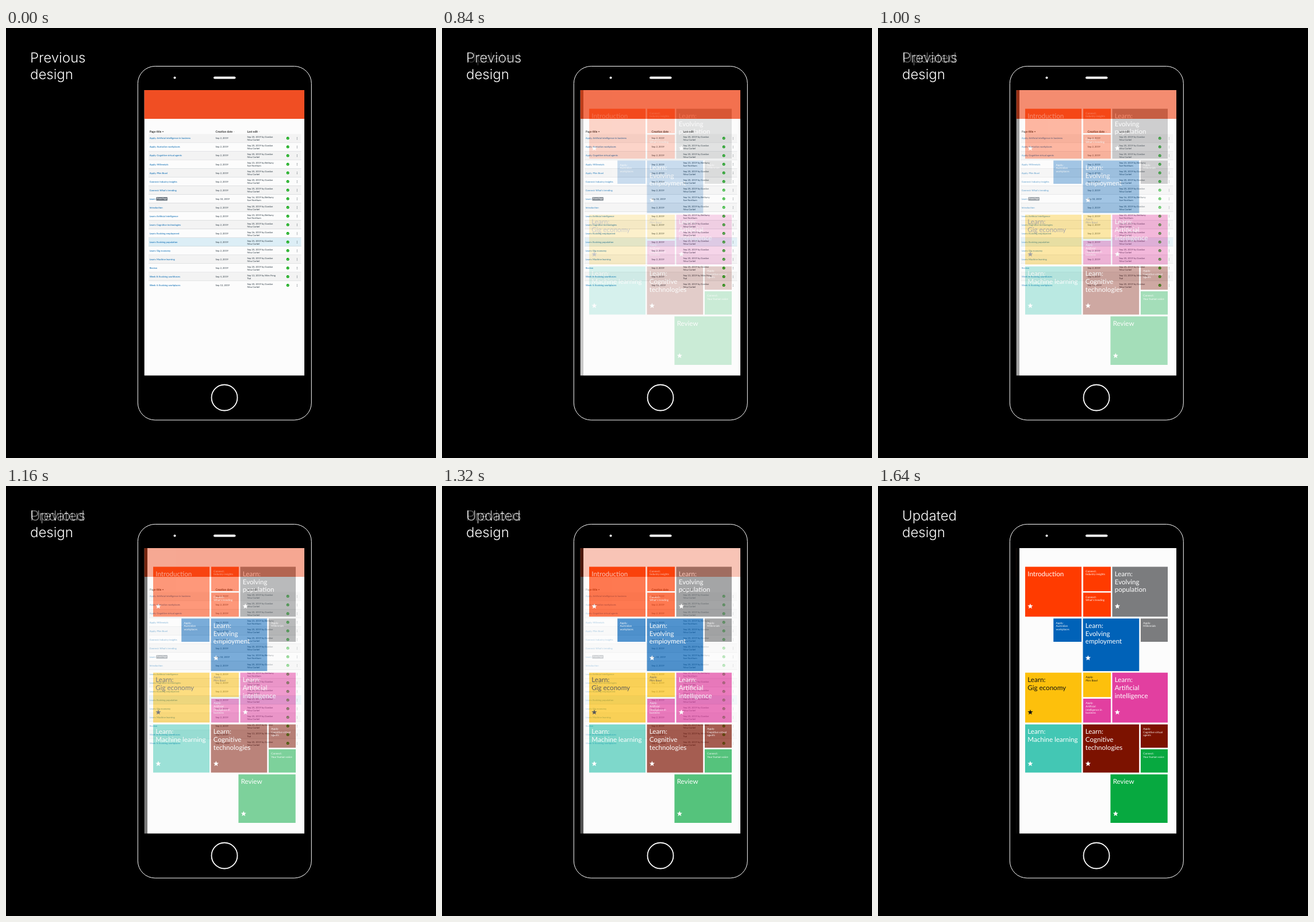
These frames come from a looping animation (748 by 748 pixels, 2.72 s). An HTML page:

```html
<!DOCTYPE html>
<html lang="en">
<head>
<meta charset="utf-8">
<title>Previous and updated design</title>
<style>
  html, body { margin: 0; width: 100%; height: 100%; overflow: hidden; background: #000; }
  svg { display: block; width: 100vw; height: 100vh; }
  text { font-family: Lato, sans-serif; text-rendering: geometricPrecision; }
  .label { font: 300 24px Inter, sans-serif; fill: #fff; }
  .head { font-size: 4.9px; font-weight: 700; fill: #222; }
  .cell { font-size: 4.2px; fill: #2d3b45; }
  .link { fill: #0a6cb4; font-weight: 500; }
  .big { font-size: 11.6px; }
  .small { font-size: 4.7px; }
  #updated { opacity: 0; animation: dissolve 2720ms infinite; }
  @keyframes dissolve {
    0% { opacity: 0; }
    25% { opacity: 0; animation-timing-function: steps(25, start); }
    61.7647%, 100% { opacity: 1; }
  }
</style>
</head>
<body>
<svg viewBox="0 0 748 748">
  <rect width="748" height="748"/>
  <g fill="none" stroke="#fff">
    <rect x="229.3" y="66.5" width="302" height="615.5" rx="30"/>
    <circle cx="380" cy="643" r="22.5" stroke-width="1.8"/>
  </g>
  <circle cx="293.5" cy="86.5" r="2" fill="#fff"/>
  <rect x="361" y="84.5" width="38.5" height="4" rx="2" fill="#fff"/>
  <text class="label" x="42" y="89">design</text>

  <g id="previous">
    <text class="label" x="42" y="60">Previous</text>
    <rect x="240.7" y="108" width="278.3" height="496.5" fill="#fcfcfc"/>
    <rect x="240.7" y="108" width="278.3" height="50" fill="#f04e23"/>
    <g class="head">
      <text class="head" x="249.7" y="181.7">Page title</text>
      <text class="head" x="364.5" y="181.7">Creation date</text>
      <text class="head" x="419.4" y="181.7">Last edit</text>
    </g>
    <path d="M272 181l1-2 1 2z" fill="#222"/>
    <path d="M396 181l.8-1.6.8 1.6zM440 181l.8-1.6.8 1.6z" fill="#bbb"/>
  </g>

  <g id="updated">
    <rect x="40" y="36" width="105" height="31"/>
    <rect x="240.2" y="107.5" width="279.3" height="497.5"/>
    <text class="label" x="42" y="60">Updated</text>
    <rect x="246" y="108" width="273" height="496.5" fill="#fcfcfc"/>
  </g>
</svg>
<script>
const previous = document.getElementById('previous');
const updated = document.getElementById('updated');

function add(parent, tag, attrs, content) {
  const el = document.createElementNS('http://www.w3.org/2000/svg', tag);
  for (const key in attrs) el.setAttribute(key, attrs[key]);
  if (content) el.textContent = content;
  parent.append(el);
  return el;
}

// Page list
const editors = {
  g: ['Gordon', 'Nina Corbel'],
  b: ['Bethany', 'Sue Northam'],
  w: ['Wen Feng', 'Tsai']
};
// title, day last edited, editor, day created
const pages = [
  ['Apply: Artificial intelligence in business'],
  ['Apply: Australian workplaces'],
  ['Apply: Cognitive virtual agents'],
  ['Apply: Millennials', 23, 'b'],
  ['Apply: Plim Bowl'],
  ['Connect: Industry insights'],
  ["Connect: What's trending"],
  ['Learn', 16, 'b', 10],
  ['Introduction'],
  ['Learn: Artificial intelligence', 23, 'b'],
  ['Learn: Cognitive technologies'],
  ['Learn: Evolving employment', 26],
  ['Learn: Evolving population', 25],
  ['Learn: Gig economy'],
  ['Learn: Machine learning'],
  ['Review'],
  ['Week 8: Evolving workforces', 13, 'w', 4],
  ['Week 4: Evolving workplaces', 20, 'g', 13]
];

pages.forEach(([title, day = 20, who = 'g', made = 2], i) => {
  const y = 192 + i * 15.04;
  const cell = (x, dy, text, cls = '') =>
    add(previous, 'text', { class: 'cell ' + cls, x, y: y + dy }, text);
  const [first, last] = editors[who];
  const fill = i === 12 ? '#dceef6' : i % 2 ? '#fcfcfc' : '#f3f3f3';

  add(previous, 'rect', { x: 248, y: y - 7.5, width: 265.5, height: 15.04, fill });
  if (i < 17) add(previous, 'rect', { x: 248, y: y + 7.1, width: 265.5, height: .6, fill: '#bfc3c6' });
  cell(249.7, 1.4, title, 'link');
  cell(364.5, 1.4, `Sep ${made}, 2019`);
  cell(419.4, -.8, `Sep ${day}, 2019 by ${first}`);
  cell(419.4, 4.2, last);
  add(previous, 'circle', { cx: 490.2, cy: y - .2, r: 2.5, fill: '#0fa815' });
  add(previous, 'path', {
    d: `M489 ${y - .2}l.9 .9 1.5 -1.7`, fill: 'none', stroke: '#fff', 'stroke-width': .6
  });
  for (const dy of [-1.7, 0, 1.7]) {
    add(previous, 'circle', { cx: 506.3, cy: y + dy, r: .5, fill: '#4a555d' });
  }
  if (title === 'Learn') {
    add(previous, 'rect', { x: 261.3, y: y - 3, width: 19.6, height: 6, rx: .8, fill: '#66707a' });
    add(previous, 'text', { x: 262.6, y: y + 1.2, 'font-size': 3.6, 'font-weight': 700, fill: '#fff' }, 'Front Page');
  }
});

// Tiles
const orange = '#ff3b00', gray = '#7b7c7e', blue = '#0062b8', yellow = '#fdc00c',
      pink = '#e23fa0', teal = '#43c7b4', maroon = '#7c1200', green = '#07a940';

function star(cx, cy) {
  const points = [];
  for (let k = 0; k < 10; k++) {
    const r = k % 2 ? 2.1 : 4.9, a = k * Math.PI / 5;
    points.push((cx + r * Math.sin(a)).toFixed(2) + ',' + (cy - r * Math.cos(a)).toFixed(2));
  }
  return points.join(' ');
}

function tile(x, y, right, bottom, color, text, starY) {
  add(updated, 'rect', { x, y, width: right - x, height: bottom - y, fill: color });
  const fill = color === yellow ? '#111' : '#fff';
  const [cls, top, step] = starY ? ['big', 16.1, 13.9] : ['small', 9.2, 5.7];
  text.split('|').forEach((line, i) =>
    add(updated, 'text', { class: cls, x: x + 4.3, y: y + top + i * step, fill }, line));
  if (starY) add(updated, 'polygon', { points: star(x + 8.9, starY), fill });
}

tile(256, 140.5, 354, 227.3, orange, 'Introduction', 209.3);
tile(357, 140.5, 405, 183, orange, 'Connect:|Industry insights');
tile(357, 185.5, 405, 227.3, orange, "Connect:|What's trending");
tile(407.5, 140.5, 504, 227.3, gray, 'Learn:|Evolving|population', 209.3);
tile(305.2, 230.5, 354, 271, blue, 'Apply:|Australian|workplaces');
tile(356.5, 230.5, 454.3, 322, blue, 'Learn:|Evolving|employment', 299.3);
tile(457, 230.5, 504, 271, gray, 'Apply:|Millennials');
tile(256, 324.7, 354, 411.5, yellow, 'Learn:|Gig economy', 393.6);
tile(357, 324.7, 405, 367.2, yellow, 'Apply:|Plim Bowl');
tile(357, 370, 405, 411.5, pink, 'Apply:|Artificial|intelligence in|business');
tile(407.5, 324.7, 504, 411.5, pink, 'Learn:|Artificial|intelligence', 393.6);
tile(256, 414.7, 354, 498.5, teal, 'Learn:|Machine learning', 483.2);
tile(356.5, 414.7, 454.2, 498.5, maroon, 'Learn:|Cognitive|technologies', 483.2);
tile(457, 414.7, 504, 455.3, maroon, 'Apply:|Cognitive virtual|agents');
tile(457, 458, 504, 498.5, green, 'Connect:|Your human voice');
tile(404.4, 501.6, 503.7, 586, green, 'Review', 570.2);
</script>
</body>
</html>
```
